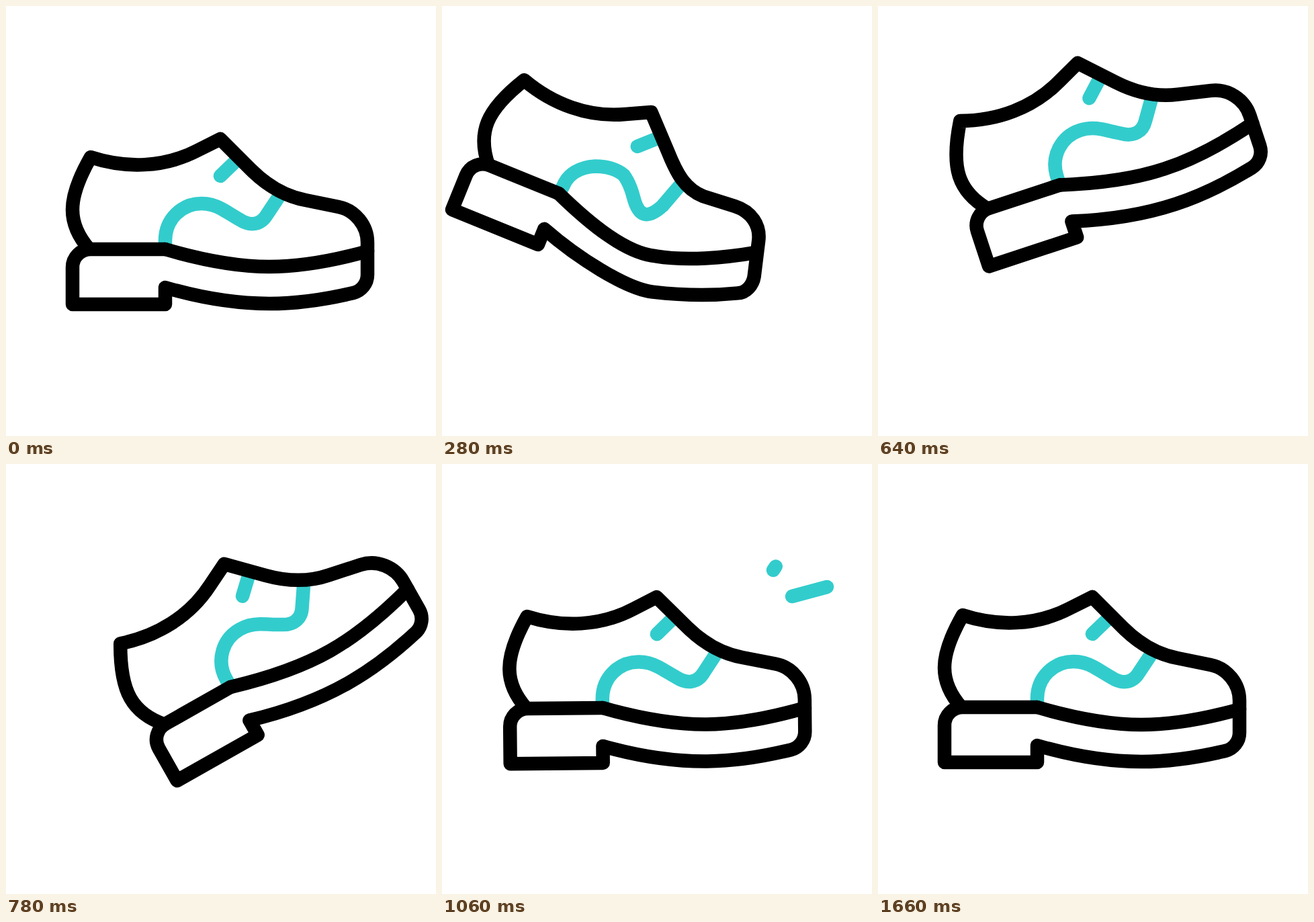
Recreate the animation shown at these times as an HTML page. Size 640 px wide and 640 px high, loop 2.4 s.

```html
<!DOCTYPE html>
<html lang="en">
<head>
<meta charset="utf-8">
<title>Walking shoe</title>
<style>
  html, body { margin: 0; width: 100%; height: 100%; overflow: hidden; background: #fff; }
  svg { display: block; width: 100vw; height: 100vh; }
  path { fill: none; stroke-width: 20.5; stroke-linejoin: round; }
  .teal { stroke: #33cccc; }
  .ink { stroke: #000; stroke-linecap: round; }
  .round { stroke-linecap: round; }
</style>
</head>
<body>
<svg viewBox="0 0 640 640">
  <g id="shoe">
    <path class="teal round" d="M319 253L345 228"/>
    <path class="teal" id="trim"/>
    <path class="ink" id="outline"/>
    <path class="ink" id="welt"/>
  </g>
  <path class="teal round" id="ray0"/>
  <path class="teal round" id="ray1"/>
  <path class="teal round" id="ray2"/>
</svg>
<script>
const LOOP = 2400, STEP = 20;
const $ = id => document.getElementById(id);

// The heel half is rigid; the toe half bends between two shapes.
const back = 'M124 362C110 346 99 325 99 303C99 280 110 253 126 225C178 242 235 241 285 215L319 198L364 243';
const heel = 'L237 444L99 444L99 389C99 374 111 362 126 362L237 362';
const shapes = {
  outline: [
    'C387 266 414 283 446 289L495 299C520 304 538 327 538 352L538 400C538 413 529 424 517 427C475 437 433 443 392 443C345 443 292 435 237 419',
    'C388 268 408 285 438 285L487 281C513 279 533 293 539 315L553 367C556 380 551 394 540 399C502 419 462 434 422 445C384 456 298 440 237 419'
  ],
  welt: [
    'M237 362C292 378 345 388 392 388C440 388 488 379 538 365',
    'M237 362C296 386 362 407 406 394C450 384 502 358 542 333'
  ],
  trim: [
    'M237 360L237 349C237 317 262 294 291 294C302 294 312 297 321 302C330 307 339 313 348 318C363 328 379 326 388 311L408 281',
    'M238 360L239 349C239 330 251 314 272 304C287 298 303 296 316 300C328 307 336 317 342 325C359 348 373 350 387 321L401 279'
  ]
};

// Keys are [ms, value]; x and y place the shoe's centre.
const keys = {
  x: [[0, 319], [140, 306], [280, 265.5], [460, 287.7], [560, 306], [780, 385], [820, 388], [940, 358], [1080, 319]],
  y: [[0, 320], [140, 309], [280, 271], [460, 225], [540, 207], [610, 198], [780, 255], [880, 313], [940, 323], [1080, 320]],
  angle: [[0, 0], [280, 22.1], [460, 6.5], [780, -29.5], [940, -14.1], [1080, 0]],
  bend: [[0, 0], [280, 1], [460, 0.45], [600, 0]]
};

const rays = [
  { from: [521, 197], to: [573, 183], grow: [900, 1000], fade: [1090, 1270] },
  { from: [493, 158], to: [519, 119], grow: [1040, 1180], fade: [1310, 1470] },
  { from: [443, 153], to: [429, 91], grow: [1180, 1310], fade: [1490, 1655] }
];

const mix = (a, b, k) => a + (b - a) * k;
const progress = (t, [a, b]) => Math.min(1, Math.max(0, (t - a) / (b - a)));

function slope(list, i) {
  if (i === 0 || i === list.length - 1) return 0;
  const rate = j => (list[j + 1][1] - list[j][1]) / (list[j + 1][0] - list[j][0]);
  const a = rate(i - 1), b = rate(i);
  return a * b > 0 ? 2 * a * b / (a + b) : 0;
}

// Smooth curve through the keys without overshoot.
function curve(list, t) {
  const last = list.length - 1;
  if (t >= list[last][0]) return list[last][1];
  let i = 0;
  while (t >= list[i + 1][0]) i++;
  const [t0, v0] = list[i], [t1, v1] = list[i + 1];
  const d = t1 - t0, u = (t - t0) / d, w = 1 - u;
  return v0 * w * w * (1 + 2 * u) + v1 * u * u * (3 - 2 * u)
    + d * u * w * (slope(list, i) * w - slope(list, i + 1) * u);
}

function morph([rest, bent], k) {
  const goal = bent.match(/\d+/g);
  let i = 0;
  return rest.replace(/\d+/g, n => mix(+n, +goal[i++], k).toFixed(2));
}

function drawRay(ray, i, t) {
  const tip = progress(t, ray.grow), tail = progress(t, ray.fade);
  const at = k => ray.from.map((v, axis) => mix(v, ray.to[axis], k)).join(' ');
  $('ray' + i).setAttribute('d', tip > tail ? `M${at(tail)}L${at(tip)}` : '');
}

function draw(t) {
  const bend = curve(keys.bend, t);
  $('outline').setAttribute('d', back + morph(shapes.outline, bend) + heel);
  $('welt').setAttribute('d', morph(shapes.welt, bend));
  $('trim').setAttribute('d', morph(shapes.trim, bend));
  $('shoe').setAttribute('transform',
    `translate(${curve(keys.x, t)} ${curve(keys.y, t)}) rotate(${curve(keys.angle, t)}) translate(-319 -320)`);
  rays.forEach((ray, i) => drawRay(ray, i, t));
}

const start = performance.now();
function frame() {
  const t = (performance.now() - start) % LOOP;
  draw(Math.floor(t / STEP) * STEP);
  requestAnimationFrame(frame);
}
frame();
</script>
</body>
</html>
```
